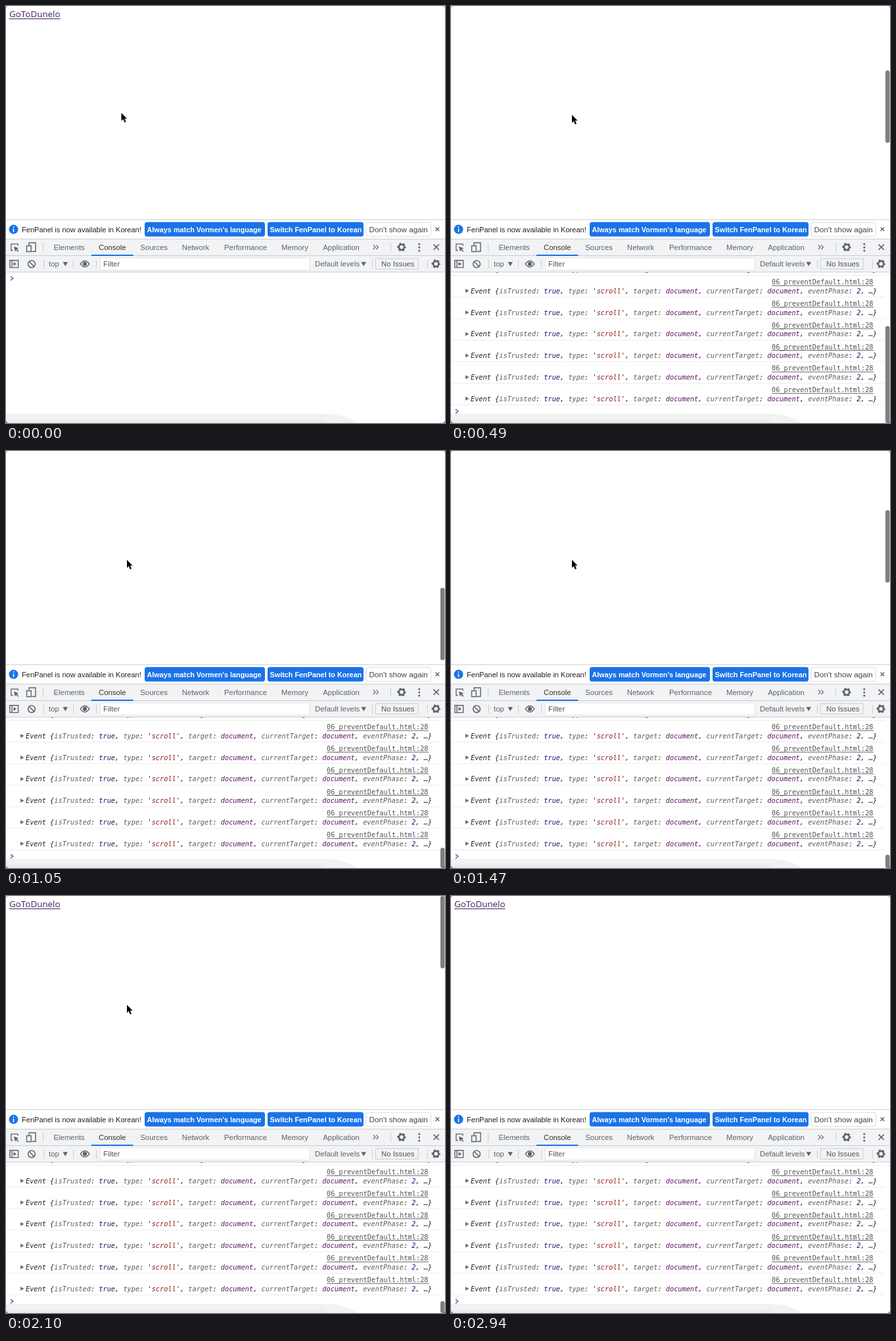
Write an HTML page that moves like this. It is 668x634 px and loops after 3010 ms.

```html
<!DOCTYPE html>
<html lang="en">
<head>
<meta charset="utf-8">
<title>Scroll events in a console</title>
<style>
  html, body { margin: 0; width: 668px; height: 634px; overflow: hidden; background: #fff; }
  svg { display: block; font: 11.35px "Liberation Sans", Arial, sans-serif; }
  .link { font: 13.4px "Open Sans", "Noto Sans", sans-serif; fill: #45205f; }
  .mono { font: 10.27px "DejaVu Sans Mono", "Liberation Mono", monospace; }
  .log { font-style: italic; fill: #222; }
  .key { fill: #5c5c5c; }
  .val { fill: #16166b; }
  .str { fill: #8e1a18; }
  .obj { fill: #5c1462; }
  .bold { font-weight: bold; font-size: 10.85px; fill: #fff; }
  .tab { fill: #5f6368; }
  .icon { fill: none; stroke: #5f6368; stroke-width: 1.4; }
  .rule { fill: none; stroke: #cacdd1; }
  .thumb { fill: #7f7f7f; }
</style>
</head>
<body>
<svg width="668" height="634" viewBox="0 0 668 634">
  <defs>
    <clipPath id="view"><path d="M0 405H668V634H0Z"/></clipPath>
    <!-- One log entry, its lower edge at y = 0 -->
    <g id="entry">
      <path d="M0 -.3H660" stroke="#ededed"/>
      <text class="mono" x="488" y="-19.6" fill="#545454">06_preventDefault.html:28</text>
      <path d="M488 -17.6H643" stroke="#545454" stroke-width=".9"/>
      <path d="M22 -12.6L27.5 -9.6L22 -6.6Z" fill="#6e6e6e"/>
      <text class="mono log" x="30" y="-6">Event {<tspan class="key">isTrusted</tspan>: <tspan class="val">true</tspan>, <tspan class="key">type</tspan>: '<tspan class="str">scroll</tspan>', <tspan class="key">target</tspan>: <tspan class="obj">document</tspan>, <tspan class="key">currentTarget</tspan>: <tspan class="obj">document</tspan>, <tspan class="key">eventPhase</tspan>: <tspan class="val">2</tspan>, …}</text>
    </g>
    <g id="gear">
      <circle r="4.1" fill="none" stroke="#5f6368" stroke-width="2.6"/>
      <circle r="5.8" fill="none" stroke="#5f6368" stroke-width="1.8" stroke-dasharray="3 3.074" stroke-dashoffset="1.5"/>
    </g>
  </defs>
  <rect width="668" height="634" fill="#fff"/>

  <!-- Page -->
  <g id="link">
    <text class="link" x="5" y="17">GoToDunelo</text>
    <path d="M5 19.5H82.5" stroke="#45205f"/>
  </g>
  <rect id="pageThumb" class="thumb" x="661" width="6.5" rx="3.2"/>

  <!-- Console log -->
  <g clip-path="url(#view)">
    <path d="M0 620H480C506 620 526 626 533 634H0Z" fill="#f2f2f2"/>
    <path d="M0 629H486V634H0Z" fill="#ececec"/>
    <g id="log">
      <path d="M7 6.5L10.8 9.6L7 12.7" fill="none" stroke="#4a74ad" stroke-width="1.5"/>
    </g>
    <rect id="logThumb" class="thumb" x="661" width="6.5" rx="3.2"/>
  </g>

  <!-- Language bar -->
  <rect y="325" width="668" height="29" fill="#fff"/>
  <path class="rule" d="M0 324.8H668"/>
  <circle cx="11.5" cy="339.6" r="7" fill="#1a73e8"/>
  <path d="M11.5 335.3V337M11.5 338.4V343.7" stroke="#fff" stroke-width="1.5"/>
  <text x="24" y="343.6" font-size="11.05" fill="#222">FenPanel is now available in Korean!</text>
  <rect x="211" y="328.6" width="183" height="22" rx="3.5" fill="#1a73e8"/>
  <text class="bold" x="214.5" y="343.6">Always match Vormen's language</text>
  <rect x="398" y="328.6" width="146" height="22" rx="3.5" fill="#1a73e8"/>
  <text class="bold" x="401.5" y="343.6">Switch FenPanel to Korean</text>
  <rect x="548" y="329" width="98.5" height="21.2" rx="3.5" fill="#fff" stroke="#dadce0"/>
  <text x="552.5" y="343.6" font-size="11.7" fill="#444">Don't show again</text>
  <path d="M653.6 336.6L659.2 342.2M659.2 336.6L653.6 342.2" stroke="#444" stroke-width="1.2"/>

  <!-- Tabs and toolbar -->
  <rect y="354" width="668" height="51" fill="#f1f3f4"/>
  <path class="rule" d="M0 354.3H668M0 379.5H668M0 404.5H668M56.5 360V374M585.5 360V374M57.5 386V399M102.5 386V399M137.5 386V399M557.5 386V399M641.5 386V399"/>
  <path d="M130 379H193.5" stroke="#1a73e8" stroke-width="1.8"/>
  <g id="tabs"></g>
  <g class="icon">
    <path d="M10.5 371.5H7.8V361.8H18V364.5" stroke-width="1.3"/>
    <path d="M12 365.5L19.5 368.4L16.4 369.6L19.2 372.6L18 373.7L15.2 370.8L13.9 373.6Z" fill="#5f6368" stroke="none"/>
    <path d="M35 363.5V360H45V373.3H39.5M31.5 364.5H38.2V373.5H31.5Z"/>
    <path d="M558.8 363.3L562 366.7L558.8 370.1M563.3 363.3L566.5 366.7L563.3 370.1" stroke-width="1.2"/>
    <path d="M650.6 362.6L658.8 370.8M658.8 362.6L650.6 370.8" stroke-width="1.6"/>
    <path d="M5.8 386.8H18.6V397.6H5.8ZM9 386.8V397.6"/>
    <path d="M11.5 389.3L16 392.2L11.5 395.1Z" fill="#5f6368" stroke="none"/>
    <circle cx="39" cy="392.3" r="5.4" stroke-width="1.5"/>
    <path d="M35.2 388.5L42.8 396.1" stroke-width="1.5"/>
    <path d="M113.2 392.2Q120 382.8 126.8 392.2Q120 401.6 113.2 392.2Z"/>
    <circle cx="120" cy="392.2" r="2.4" fill="#5f6368"/>
  </g>
  <g fill="#5f6368">
    <circle cx="628.8" cy="362" r="1.5"/><circle cx="628.8" cy="367" r="1.5"/><circle cx="628.8" cy="372" r="1.5"/>
    <path d="M86.5 389.2H94L90.2 395.4ZM540.5 389.2H548L544.2 395.4Z"/>
  </g>
  <use href="#gear" x="602" y="366.6"/>
  <use href="#gear" x="654.3" y="392"/>
  <text class="tab" x="65" y="396">top</text>
  <rect x="143.5" y="383" width="318.5" height="18.5" fill="#fff" stroke="#e3e5e8"/>
  <text x="148" y="396.2" fill="#555">Filter</text>
  <text class="tab" x="470" y="396">Default levels</text>
  <rect class="rule" x="562.5" y="384" width="64.5" height="16"/>
  <text x="571" y="396" fill="#505357">No Issues</text>

  <path id="cursor" d="M0 0V12.2L2.8 9.6L4.9 14.5L7 13.6L4.9 8.8H8.6Z" stroke="#fff" stroke-width="1.6" paint-order="stroke"/>
  <path d="M0 0H3L0 3ZM668 0H665L668 3Z" fill="#c4c4c4"/>
  <path d="M0 634H3L0 631ZM668 634H665L668 631Z" fill="#777"/>
</svg>
<script>
  const LOOP = 3010, STEP = 70, ROW = 32.8, PAGE = 324, THUMB = 110;
  const LOG_TOP = 404.5, LOG_END = 606.7, LOG_VIEW = 229, PROMPT = 27.5;
  const $ = id => document.getElementById(id);

  const make = (tag, parent, attrs) => {
    const el = document.createElementNS(parent.namespaceURI, tag);
    for (const name in attrs) el.setAttribute(name, attrs[name]);
    return parent.appendChild(el);
  };
  const set = (id, attrs) => {
    for (const name in attrs) $(id).setAttribute(name, attrs[name]);
  };

  const tabs = { Elements: 72.5, Console: 141, Sources: 204.3, Network: 267.7, Performance: 332, Memory: 419, Application: 482.3 };
  for (const name in tabs) {
    make("text", $("tabs"), { x: tabs[name], y: 370.8, fill: name === "Console" ? "#333" : "#5f6368" }).textContent = name;
  }
  const entries = Array.from({ length: 7 }, (_, i) => make("use", $("log"), { href: "#entry", y: -ROW * i }));

  // Linear interpolation through [time, value] points
  const along = (points, t) => {
    const i = points.findIndex(p => p[0] > t);
    if (i < 0) return points[points.length - 1][1];
    if (!i) return points[0][1];
    const [t0, v0] = points[i - 1], [t1, v1] = points[i];
    return v0 + (v1 - v0) * (t - t0) / (t1 - t0);
  };

  const thumbTop = [[330, 0], [420, 50], [490, 98], [560, 129], [630, 151], [700, 168], [770, 181],
    [840, 191], [910, 198], [980, 203.5], [1050, 208], [1120, 210], [1190, 210], [1260, 198],
    [1400, 130], [1540, 50], [1610, 20], [1680, 0]];
  const bounce = [[1680, 0], [1750, 14], [1820, 10.5], [1890, 6.5], [1960, 3.5], [2030, 1.5], [2100, 0]];
  const logged = [[330, 0], [490, 10.2], [770, 28.8], [1050, 50.7], [1680, 92], [2100, 118]];

  function draw(t) {
    const top = along(thumbTop, t), over = along(bounce, t);
    const count = Math.round(along(logged, t));
    const fade = t < 350 ? 0 : along([[2240, 1], [2380, 0]], t);

    set("link", { transform: `translate(0 ${over - top * PAGE / THUMB})` });
    set("pageThumb", { y: top, height: THUMB - over * 0.2, opacity: fade });

    set("log", { transform: `translate(0 ${Math.min(LOG_TOP + ROW * count, LOG_END)})` });
    entries.forEach((el, i) => el.setAttribute("visibility", i < count ? "visible" : "hidden"));
    const content = count * ROW + PROMPT;
    const height = Math.max(18, LOG_VIEW * LOG_VIEW / content);
    set("logThumb", { y: 634 - height, height, opacity: content > LOG_VIEW ? fade : 0 });

    const x = along([[0, 175.5], [350, 184]], t), y = along([[0, 162.5], [350, 165.5]], t);
    set("cursor", { transform: `translate(${x} ${y})`, opacity: t < 2310 ? 1 : 0 });
  }

  const start = performance.now();
  function tick() {
    const t = (performance.now() - start) % LOOP;
    draw(Math.floor(t / STEP) * STEP);
    requestAnimationFrame(tick);
  }
  tick();
</script>
</body>
</html>
```
